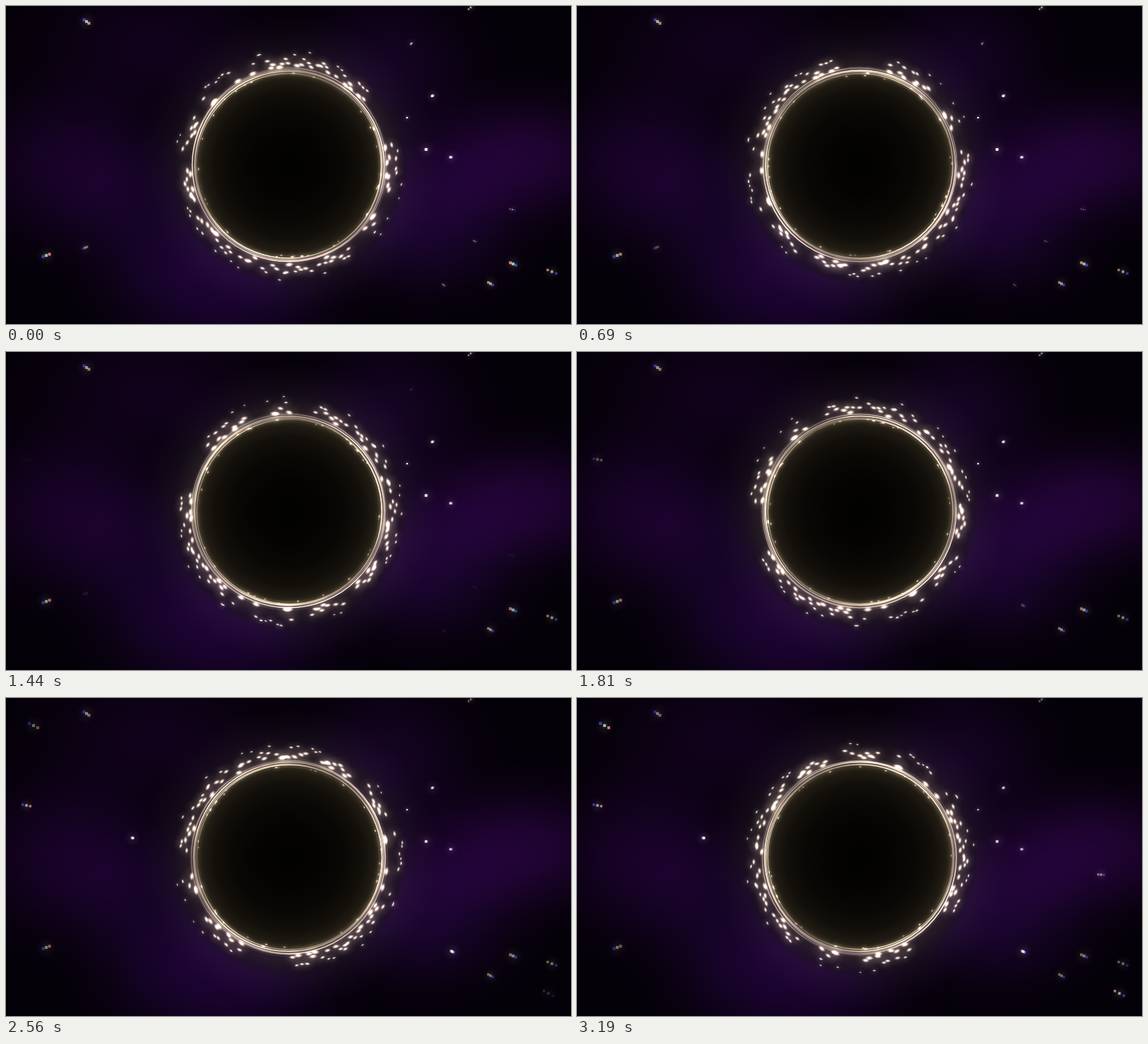
An HTML page with a canvas that plays this animation: 800 by 450 pixels, repeating every 3250 ms.

```html
<!DOCTYPE html>
<html lang="en">
<head>
<meta charset="utf-8">
<title>Black hole</title>
<style>
html, body { margin: 0; width: 100%; height: 100%; overflow: hidden; background: #05010a; }
canvas { display: block; width: 800px; height: 450px; }
</style>
</head>
<body>
<canvas id="stage" width="800" height="450"></canvas>
<script>
const W = 800, H = 450, CX = 400.5, CY = 225.5;
const LOOP = 3250, STEP = 62.5, TAU = Math.PI * 2;
const SPIN = Math.PI / 2000; // radians per ms, counterclockwise
const REF = 2312.5;          // moment at which the clump angles hold
const ctx = document.getElementById('stage').getContext('2d');

// Clumps of sparks: middle angle and half width in degrees
const CLUMPS = [[278, 17], [312, 17], [350, 10], [20, 12], [57, 17], [92, 20], [154, 15], [186, 7], [216, 11], [243, 14]];

// Stars: x, y, size
const STEADY = [
  [114, 22, 4], [658, 2, 2.5], [604, 127, 3.2], [568, 158, 2], [595, 203, 3.4],
  [630, 214, 3], [718, 365, 4], [773, 376, 3.4], [686, 393, 3.4], [57, 353, 4]
];
const FADING = [[574, 53, 2.4], [717, 288, 2], [664, 333, 1.6], [620, 395, 1.8], [112, 342, 3]];
// In order of their rise
const RISING = [[29, 152, 3.2], [632, 359, 3.6], [179, 198, 3.3], [39, 39, 4], [768, 418, 3.4], [742, 250, 3]];

function random(seed) {
  return () => {
    seed = (seed * 16807) % 2147483647;
    return seed / 2147483647;
  };
}
const rnd = random(4177);
const clamp = v => Math.max(0, Math.min(1, v));

function layer(w, h) {
  const c = document.createElement('canvas');
  c.width = w;
  c.height = h;
  return c;
}

function radial(g, r0, r1, stops) {
  const grad = g.createRadialGradient(0, 0, r0, 0, 0, r1);
  stops.forEach(([at, color]) => grad.addColorStop(at, color));
  return grad;
}

function blob(g, x, y, rx, ry, rgb, alpha) {
  g.save();
  g.translate(x, y);
  g.scale(rx, ry);
  g.fillStyle = radial(g, 0, 1, [0, .25, .5, .75, 1].map(
    p => [p, `rgba(${rgb},${alpha * (1 + Math.cos(Math.PI * p)) / 2})`]));
  g.fillRect(-1, -1, 2, 2);
  g.restore();
}

function disc(g, r, fill) {
  g.beginPath();
  g.arc(0, 0, r, 0, TAU);
  g.fillStyle = fill;
  g.fill();
}

function sprite(stops) {
  const c = layer(64, 64), g = c.getContext('2d');
  g.translate(32, 32);
  disc(g, 32, radial(g, 0, 32, stops));
  return c;
}
const core = sprite([
  [0, 'rgba(250,246,234,1)'], [.3, 'rgba(242,232,212,.9)'],
  [.65, 'rgba(205,190,165,.38)'], [1, 'rgba(160,145,125,0)']
]);
const halo = sprite([
  [0, 'rgba(190,175,150,.26)'], [.4, 'rgba(150,136,115,.09)'], [1, 'rgba(120,108,95,0)']
]);

function paintSky() {
  const c = layer(W, H), g = c.getContext('2d');
  g.fillStyle = '#050109';
  g.fillRect(0, 0, W, H);
  g.globalCompositeOperation = 'lighter';
  blob(g, 725, 215, 210, 125, '34,3,52', .85);
  blob(g, 590, 300, 190, 150, '30,5,52', .8);
  blob(g, 90, 225, 180, 160, '25,2,40', .8);
  blob(g, 310, 395, 220, 150, '28,3,50', .8);
  blob(g, 200, 300, 160, 170, '20,3,36', .6);
  blob(g, 210, 60, 230, 140, '18,2,28', .65);
  blob(g, 540, 90, 170, 150, '24,4,40', .65);
  g.globalCompositeOperation = 'source-over';

  // Dim disc, the warm light around the ring, and the hole
  g.translate(400, 227);
  disc(g, 167, radial(g, 130, 167, [
    [0, 'rgba(10,5,12,.8)'], [.8, 'rgba(10,5,14,.5)'], [1, 'rgba(10,4,16,0)']
  ]));
  g.translate(CX - 400, CY - 227);
  g.globalCompositeOperation = 'lighter';
  disc(g, 215, radial(g, 130, 215, [
    [0, 'rgba(112,100,82,.5)'], [.14, 'rgba(78,69,60,.36)'],
    [.4, 'rgba(52,45,43,.24)'], [1, 'rgba(30,24,26,0)']
  ]));
  g.globalCompositeOperation = 'source-over';
  disc(g, 132, radial(g, 0, 132, [
    [0, '#020201'], [.3, '#040302'], [.6, '#0a0805'], [.8, '#13100b'],
    [.92, '#201b13'], [1, '#3c3426']
  ]));
  return c;
}
const sky = paintSky();

// Sparks shrink towards the outer edge of the disc
const sparks = CLUMPS.flatMap(([mid, half]) => {
  const count = Math.round(half * .95);
  return Array.from({ length: count }, (_, i) => {
    const far = rnd() ** 1.2;
    const deg = mid + half * (2 * (i + rnd()) / count - 1);
    return {
      a: deg * Math.PI / 180,
      r: 139 + far * 24,
      size: 1.1 - far * .65 + (rnd() - .5) * .3,
      light: .95 - far * .25,
      tilt: (rnd() - .3) * .4
    };
  });
});
const rim = Array.from({ length: 30 }, () => ({
  a: rnd() * TAU, r: 127 + rnd() * 4,
  size: .3 + rnd() * .4, light: .3 + rnd() * .5, tilt: 0
}));

function glint(p, turn) {
  const a = p.a - turn;
  ctx.save();
  ctx.translate(CX + p.r * Math.cos(a), CY + p.r * Math.sin(a));
  ctx.rotate(a + Math.PI / 2 + p.tilt);
  ctx.scale(p.size, p.size);
  ctx.globalAlpha = p.light;
  ctx.drawImage(halo, -15, -15, 30, 30);
  ctx.drawImage(core, -6, -3, 12, 6);
  ctx.restore();
}

// A thin ellipse whose brightness varies around it
function ring(dx, dy, r, width, light, phase) {
  const x = CX + dx, y = CY + dy;
  const grad = ctx.createConicGradient(phase, x, y);
  for (let i = 0; i <= 24; i++) {
    const v = .6 + .25 * Math.sin(i * TAU / 8) + .15 * Math.sin(i * TAU / 4.8);
    grad.addColorStop(i / 24, `rgba(216,200,174,${light * v})`);
  }
  ctx.beginPath();
  ctx.ellipse(x, y, r, r - .3, 0, 0, TAU);
  ctx.lineWidth = width;
  ctx.strokeStyle = grad;
  ctx.stroke();
}

function drawRings(turn) {
  ring(0, 0, 134, 14, .1, -turn);
  ring(0, 0, 134, 8, .2, 2 - turn);
  for (let i = 0; i < 5; i++) {
    const a = i * 2.4 - turn * .5;
    ring(Math.cos(a), Math.sin(a), 131 + i * 1.6, 1.3, .6, i * 1.9 - turn);
  }
}

function star([x, y, size], light) {
  if (light <= 0) return;
  const dx = x - 400, dy = y - 225;
  const k = (dx * dx + dy * dy) * 1e-7;
  ctx.globalAlpha = light;
  ctx.drawImage(halo, x - size * 3.5, y - size * 3.5, size * 7, size * 7);
  ['#b07c62', '#6aa468', '#2c30a8'].forEach((color, i) => {
    const px = x + (i - 1) * k * dx, py = y + (i - 1) * k * dy;
    ctx.fillStyle = color;
    ctx.fillRect(px - size / 2, py - size / 2, size, size);
  });
  ctx.globalAlpha = 1;
}

function draw(t) {
  const turn = (t - REF) * SPIN;
  ctx.globalCompositeOperation = 'source-over';
  ctx.drawImage(sky, 0, 0);
  ctx.globalCompositeOperation = 'lighter';
  STEADY.forEach(s => star(s, .95 - .35 * t / LOOP));
  FADING.forEach(s => star(s, .7 * clamp(1 - t / 1700)));
  RISING.forEach((s, i) => star(s, .95 * clamp((t - 1400 - i * 240) / 750)));
  drawRings(turn);
  rim.forEach(p => glint(p, turn));
  sparks.forEach(p => glint(p, turn));
}

const start = performance.now();
function tick(now) {
  const t = Math.max(0, now - start) % LOOP;
  draw(Math.min(51, Math.floor((t + 2.5) / STEP)) * STEP);
  requestAnimationFrame(tick);
}
draw(0);
requestAnimationFrame(tick);
</script>
</body>
</html>
```
